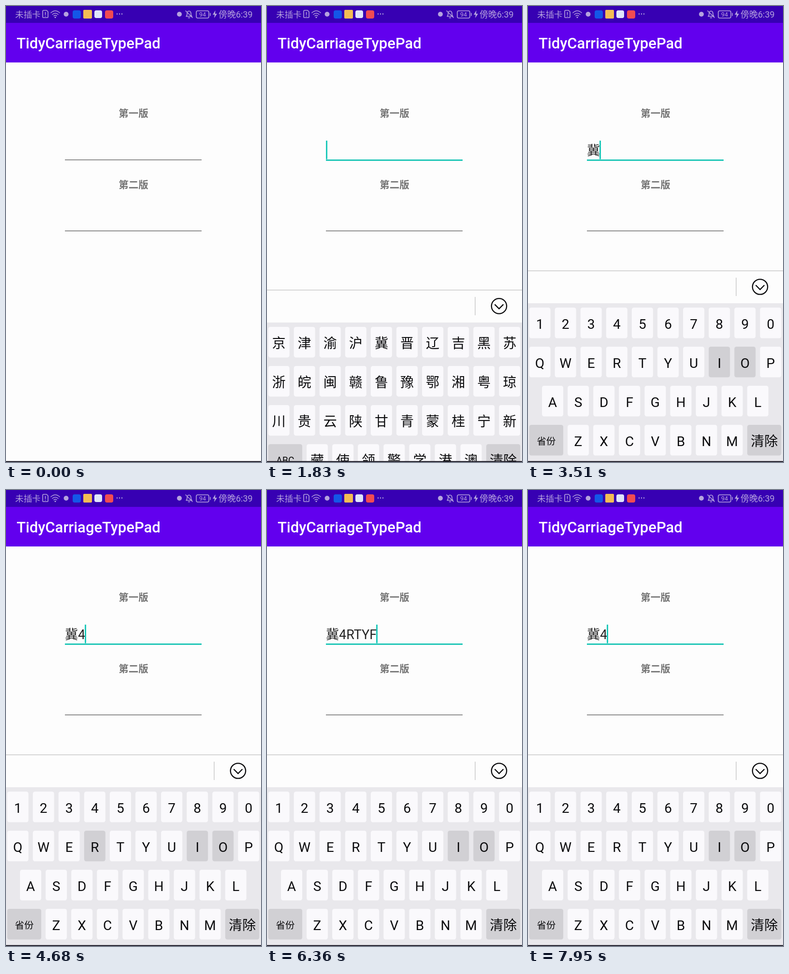
Write an HTML page that moves like this. It is 528 px wide and 945 px high and loops after 8000 ms.

```html
<!DOCTYPE html>
<html lang="zh-CN">
<head>
<meta charset="utf-8">
<style>
  html, body { margin: 0; width: 100%; height: 100%; overflow: hidden; background: #fdfdfd; }
  svg { display: block; font-family: Roboto, "Noto Sans CJK SC", "Noto Sans CJK", sans-serif; }
  .status { fill: none; stroke: #b5a3de; stroke-width: 1.6; stroke-linecap: round; stroke-linejoin: round; }
  .status text, .status .solid { fill: #b5a3de; stroke: none; }
  .heading { font-size: 20.5px; font-weight: 700; fill: #757575; text-anchor: middle; }
  .key, .popup { font-size: 28px; fill: #0b0b0d; text-anchor: middle; }
  .small { font-size: 19.5px; }
</style>
</head>
<body>
<svg id="stage" width="528" height="945" viewBox="0 0 528 945">
  <rect width="528" height="945" fill="#fdfdfd"/>
  <rect width="528" height="117" fill="#6200ee"/>
  <rect width="528" height="35" fill="#3700b3"/>

  <g class="status">
    <text x="19" y="24" font-size="17.5">未插卡</text>
    <path d="M78 9h6l3 3v11q0 1-1 1h-9q-1 0-1-1V11q0-2 2-2zM81.500 13v5M81.500 21v.2"/>
    <path d="M93 14q9-8 18 0M96 17.500q6-5 12 0M99 20.500q3-2.500 6 0"/>
    <circle class="solid" cx="102" cy="23.500" r="1.500"/>
    <circle class="solid" cx="124.500" cy="17" r="5"/>
    <g stroke="none">
      <rect x="138" y="9" width="17" height="17" rx="4" fill="#1457e8"/>
      <rect x="160" y="8" width="18" height="18" rx="2" fill="#f3bd55"/>
      <rect x="183" y="9" width="16" height="16" rx="4" fill="#dfe5fb"/>
      <rect x="205" y="9" width="17" height="17" rx="4" fill="#f14b52"/>
    </g>
    <path d="M230 16.500h.1M235 16.500h.1M240 16.500h.1" stroke-width="2.400"/>
    <circle class="solid" cx="359" cy="17" r="5"/>
    <path d="M373 21.500h12q-2-2-2-5 0-6-4-6t-4 6q0 3-2 5M377.500 24.500h3M372 10l14 14"/>
    <rect x="394" y="10" width="26" height="15" rx="3"/>
    <path d="M423 15v5"/>
    <text x="407" y="22" font-size="12.500" text-anchor="middle">94</text>
    <path class="solid" d="M433.500 9l-5.500 9h4l-1 7 6-9h-4z"/>
    <text x="440" y="24" font-size="18">傍晚6:39</text>
  </g>

  <text x="22" y="88" font-size="31" font-weight="500" fill="#fff">TidyCarriageTypePad</text>
  <text class="heading" x="264" y="230">第一版</text>
  <text class="heading" x="264" y="377.500">第二版</text>
  <rect id="line" x="122" width="283"/>
  <rect x="122" y="465.300" width="283" height="1.600" fill="#777"/>
  <text id="plate" x="122" y="309" font-size="27" fill="#222"></text>
  <rect id="cursor" y="279" width="3" height="38.500" fill="#1fc9ba"/>

  <g id="keyboard">
    <rect y="548" width="528" height="69" fill="#fdfdfd"/>
    <rect y="548" width="528" height="1.500" fill="#c9c9c9"/>
    <rect y="616" width="528" height="330" fill="#e9e8ec"/>
    <rect x="430.300" y="563" width="1.500" height="38" fill="#c9c9c9"/>
    <g fill="none" stroke="#0b0b0d" stroke-width="2.300">
      <circle cx="480.500" cy="582" r="15.700"/>
      <path d="M471.500 578.500l9 9 9-9"/>
    </g>
    <g id="provinces"></g>
    <g id="letters"></g>
    <g id="popup" class="popup">
      <rect height="70" rx="5" fill="#fbfafd" stroke="#dddce1"/>
      <text></text>
    </g>
  </g>
  <rect y="943" width="528" height="2" fill="#25232e"/>
</svg>
<script>
const $ = id => document.getElementById(id);
const LIGHT = '#faf9fc', DARK = '#d1d0d4', STEP = 53.1, LOOP = 8000, CLEAR = '清除';

function set(el, attrs) {
  for (const name in attrs) el.setAttribute(name, attrs[name]);
  return el;
}
function add(parent, tag, attrs) {
  return parent.appendChild(set(document.createElementNS('http://www.w3.org/2000/svg', tag), attrs));
}

function buildLayout(group, rows, modeLabel) {
  const keys = {};
  function addKey(label, x, y, w, fill, small) {
    const rect = add(group, 'rect', { x, y, width: w, height: 63.5, rx: 4.5, fill });
    const text = add(group, 'text', { x: x + w / 2, y: y + (small ? 41 : 44), class: small ? 'key small' : 'key' });
    text.textContent = label;
    keys[label] = { rect, x, y, w, fill };
  }
  rows.forEach((row, r) => {
    const y = 625 + 81 * r;
    const left = r === 3 ? 82 : row.length === 9 ? 29 : 2.5;
    [...row].forEach((label, i) =>
      addKey(label, left + STEP * i, y, 44, 'IO'.includes(label) ? DARK : LIGHT));
  });
  addKey(modeLabel, 2.5, 868, 70.5, DARK, true);
  addKey(CLEAR, 454, 868, 70.5, DARK);
  return keys;
}

const provinces = buildLayout($('provinces'),
  ['京津渝沪冀晋辽吉黑苏', '浙皖闽赣鲁豫鄂湘粤琼', '川贵云陕甘青蒙桂宁新', '藏使领警学港澳'], 'ABC');
const letters = buildLayout($('letters'),
  ['1234567890', 'QWERTYUIOP', 'ASDFGHJKL', 'ZXCVBNM'], '省份');

// label, finger down, finger up
const presses = [
  ['冀', 2640, 3510], ['4', 4170, 4230], ['R', 4680, 5040],
  ['T', 5340, 5550], ['Y', 5790, 5970], ['F', 6150, 6330],
  [CLEAR, 6960, 7080], [CLEAR, 7290, 7680], [CLEAR, 7710, 7800], [CLEAR, 7860, 7950]
];
const FOCUS = 1410, OPEN = 1770, OPENED = 1980, SWITCH = 3510, POPUP_DELAY = 30;

function showPopup(label, key) {
  const wide = label === CLEAR;
  const x = wide ? 421 : key.x - 16, w = wide ? 106 : 76, y = key.y - 77;
  const [box, text] = $('popup').children;
  set(box, { x, y, width: w });
  set(text, { x: x + w / 2, y: y + 45 }).textContent = label;
}

function draw(t) {
  const focused = t >= FOCUS;
  set($('line'), focused
    ? { y: 318, height: 3, fill: '#22c7b8' }
    : { y: 318, height: 1.6, fill: '#777' });

  const typed = presses.filter(p => t >= p[2]).reduce(
    (text, [label]) => label === CLEAR ? text.slice(0, -1) : text + label, '');
  $('plate').textContent = typed;
  set($('cursor'), {
    x: typed ? Math.round(121 + $('plate').getComputedTextLength()) : 122,
    visibility: focused ? 'visible' : 'hidden'
  });

  const slide = 40.5 * Math.pow(Math.max(0, OPENED - t) / 150, 2.3);
  set($('keyboard'), { transform: `translate(0 ${slide})`, display: t >= OPEN ? 'inline' : 'none' });
  const typing = t >= SWITCH, keys = typing ? letters : provinces;
  set($('provinces'), { display: typing ? 'none' : 'inline' });
  set($('letters'), { display: typing ? 'inline' : 'none' });

  const press = presses.find(p => t >= p[1] && t < p[2]);
  for (const label in keys)
    set(keys[label].rect, { fill: press && press[0] === label ? DARK : keys[label].fill });
  const popped = press && t >= press[1] + POPUP_DELAY;
  set($('popup'), { display: popped ? 'inline' : 'none' });
  if (popped) showPopup(press[0], keys[press[0]]);
}

const start = performance.now();
function tick() {
  draw((performance.now() - start) % LOOP);
  requestAnimationFrame(tick);
}
tick();
</script>
</body>
</html>
```
